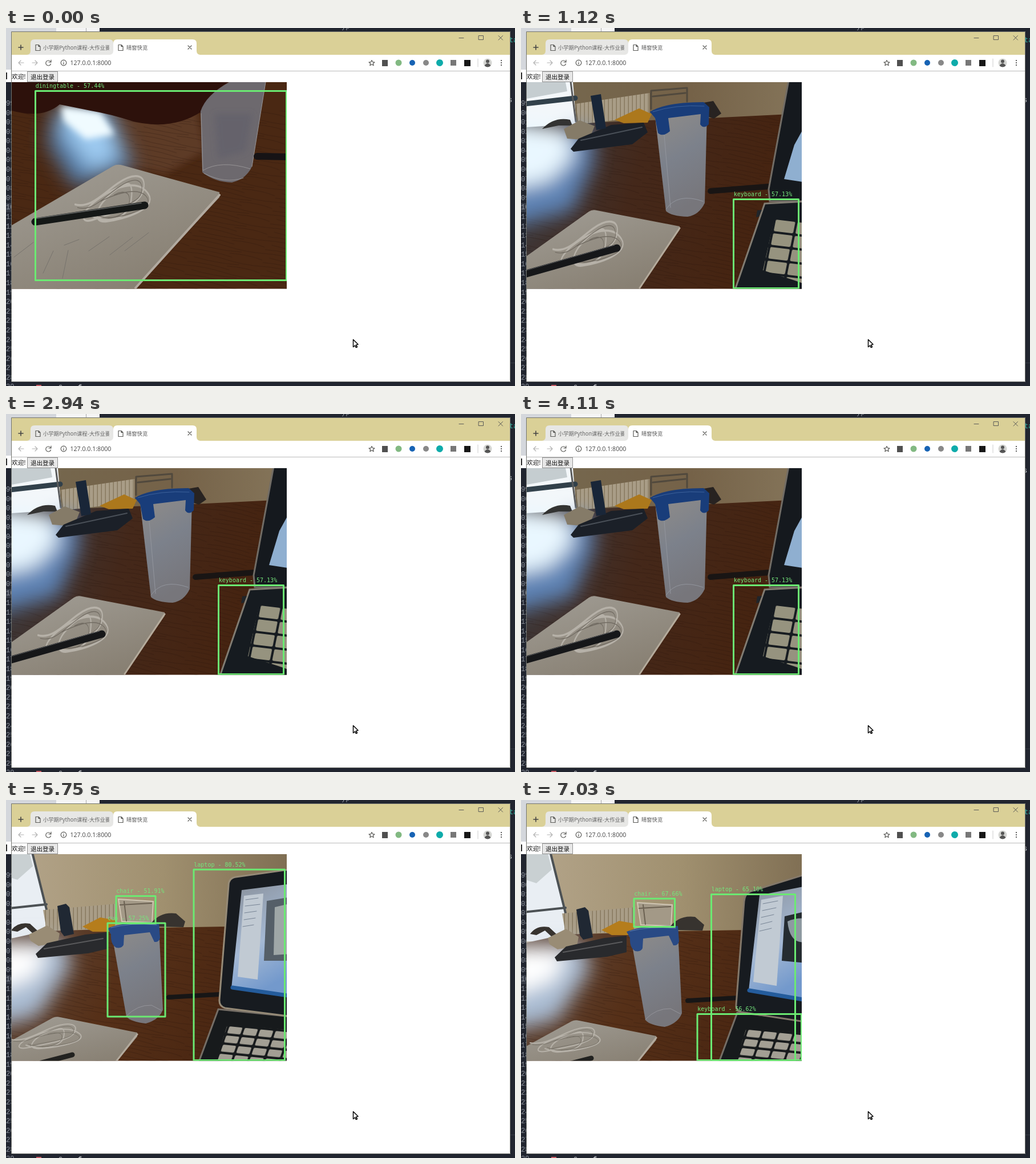
An HTML page that plays this animation: 892x628 px, repeating every 8000 ms.

```html
<!DOCTYPE html>
<html lang="zh">
<head>
<meta charset="utf-8">
<style>
html, body { margin: 0; width: 100%; height: 100%; overflow: hidden; background: #21252f }
svg { display: block; width: 892px; height: 628px }
text { white-space: pre }
.mono { font: 10px "DejaVu Sans Mono", monospace }
.code { font: 12px "Liberation Mono", monospace; fill: #8d939d }
.cjk { font-family: "Noto Sans CJK SC", "Noto Sans CJK", sans-serif }
.line { fill: none; stroke-linecap: round; stroke-linejoin: round }
.label { fill: #74e67c }
.box { fill: none; stroke: #6bea72; stroke-width: 3; stroke-linejoin: round }
</style>
</head>
<body>
<svg viewBox="0 0 892 628">
<defs>
  <clipPath id="photo"><path d="M10 95H492V457.500H10Z"/></clipPath>
  <clipPath id="tab"><path d="M60 20H181V47H60Z"/></clipPath>
  <filter id="blur" x="-60%" y="-60%" width="220%" height="220%"><feGaussianBlur stdDeviation="17"/></filter>
  <filter id="soft" x="-30%" y="-30%" width="160%" height="160%"><feGaussianBlur stdDeviation="6"/></filter>
  <pattern id="grain" width="130" height="23" patternUnits="userSpaceOnUse" patternTransform="rotate(11)">
    <path class="line" stroke="#210d05" stroke-opacity=".3" d="M0 3Q32 -1 65 3T130 3M10 9Q50 13 90 8M70 14Q105 10 128 15M0 19Q40 15 75 20"/>
  </pattern>
  <pattern id="bars" width="7" height="60" patternUnits="userSpaceOnUse">
    <path fill="#a99d87" d="M0 0H7V60H0Z"/><path fill="#87795f" d="M5.500 0H7V60H5.500Z"/>
  </pattern>
  <pattern id="keys" width="27" height="16" patternUnits="userSpaceOnUse" patternTransform="matrix(1 .1 -.35 1 391 396)">
    <rect x="1" y="1" width="23" height="12" rx="2" fill="#a39f94"/>
  </pattern>
  <pattern id="bigKeys" width="38" height="24" patternUnits="userSpaceOnUse" patternTransform="matrix(1 .12 -.2 1 446 335)">
    <rect x="1" y="1" width="34" height="20" rx="2" fill="#96937f"/>
  </pattern>
  <linearGradient id="wall"><stop stop-color="#b4a58b"/><stop offset=".55" stop-color="#a0906f"/><stop offset="1" stop-color="#7e6d52"/></linearGradient>
  <linearGradient id="wallDark"><stop stop-color="#75684f"/><stop offset=".6" stop-color="#756248"/><stop offset="1" stop-color="#85755a"/></linearGradient>
  <linearGradient id="wood" x2="1" y2=".25"><stop stop-color="#604b3f"/><stop offset=".45" stop-color="#563018"/><stop offset="1" stop-color="#472410"/></linearGradient>
  <linearGradient id="woodDark" x2="1" y2=".2"><stop stop-color="#3b3c42"/><stop offset=".45" stop-color="#44281a"/><stop offset="1" stop-color="#46230f"/></linearGradient>
  <linearGradient id="sheet" x2=".6" y2="1"><stop stop-color="#a19d95"/><stop offset="1" stop-color="#888073"/></linearGradient>
  <linearGradient id="plastic" x2=".3" y2="1"><stop stop-color="#8f8c89"/><stop offset=".5" stop-color="#7c818b"/><stop offset="1" stop-color="#77767b"/></linearGradient>
  <linearGradient id="screen" y2="1" x2=".3"><stop stop-color="#89909a"/><stop offset=".6" stop-color="#a5b9d4"/><stop offset="1" stop-color="#7399cc"/></linearGradient>

  <g id="cable" class="line" stroke="#b6b1a8" stroke-width="2">
    <path d="M0 30C25 34 45 20 70 10S118 0 112 16S60 38 32 44S10 36 40 24S104 6 120 20S80 44 52 46S36 30 62 18S96 8 92 26S50 50 26 40"/>
    <path stroke="#726c63" stroke-width=".8" d="M4 33C29 37 47 23 73 13S112 6 109 18S62 34 34 41M42 27S98 10 116 22S82 41 54 43M64 21S91 12 89 27S52 47 30 38"/>
  </g>

  <g id="desk">
    <path fill="url(#wall)" d="M0 80H500V300H0Z"/>
    <path fill="#e9eef3" d="M-5 80H42L69 186V242H-5Z"/>
    <path fill="#c9d0d2" d="M-5 80H38L47 116L20 140L-5 132Z"/>
    <path class="line" stroke="#4c5154" stroke-width="4" d="M43 80L71 192M-5 191L71 183"/>
    <path fill="url(#bars)" d="M65 193L194 182V222L72 232Z"/>
    <path fill="#a39987" stroke="#d1c7b4" stroke-width="2" d="M197 174L258 178L256 215L203 213Z"/>
    <path class="line" stroke="#6a6051" stroke-width="2" d="M200 184L255 181M207 178L211 212"/>
    <path fill="url(#wood)" d="M-5 246L68 230L265 224L386 222L510 240V470H-5Z"/>
    <path fill="url(#grain)" d="M-5 260L230 228L386 223L492 240V470H-5Z"/>
    <g filter="url(#blur)"><path fill="#a9bbd2" d="M-30 249L100 246L115 290L55 380L-30 400Z"/><path fill="#fff" d="M-30 253L73 258L53 310L-30 342Z"/></g>
    <path fill="#37332f" d="M9 229Q20 213 42 217L56 230L48 235L35 223L20 231ZM250 222Q267 195 298 199L314 213L311 223Z"/>
    <path fill="#998c75" d="M40 236L72 220L94 234L91 250L57 256L43 247Z"/>
    <path fill="#b57d1c" d="M134 222L165 206L193 211L188 231L152 231Z"/>
    <path fill="#292a2d" d="M52 270L72 251L139 236L178 232L178 261L144 269L56 277Z"/>
    <path class="line" stroke="#5a5a5c" stroke-width="2" d="M67 261L170 243"/>
    <path fill="#202833" d="M90 186L105 182L111 188L119 235L102 239L96 231Z"/>
    <path class="line" stroke="#171616" stroke-width="8" d="M285 346L373 341"/>
    <path fill="url(#plastic)" d="M184 227L268 224L275 368Q268 386 245 392Q219 389 211 380Z"/>
    <path class="line" stroke="#94949a" d="M211 379Q230 359 255 360L272 369"/>
    <path fill="#294a85" d="M178 225Q207 213 268 215L270 242Q268 250 260 249L252 232L207 237L206 254Q203 261 193 259Q183 253 184 236Z"/>
    <path class="line" stroke="#627fae" d="M184 224Q218 215 264 219"/>
    <path fill="url(#sheet)" d="M-5 430L82 382Q88 379 95 381L230 408V415L185 470H-5Z"/>
    <path class="line" stroke="#b3aa9d" stroke-width="3" d="M230 411L188 465"/>
    <use href="#cable" x="9" y="390"/>
    <path class="line" stroke="#222220" stroke-width="9" d="M62 461L116 447"/>
    <path fill="#171a1c" stroke="#756e66" stroke-width="3" d="M372 367L510 381V470H334Z"/>
    <path fill="url(#keys)" d="M388 394L500 404V470H364Z"/>
    <path class="line" stroke="#8d8378" stroke-width="4" d="M400 364L462 371"/>
  </g>
</defs>

<g id="backdrop">
  <path fill="#d4d7dc" d="M0 0H88V73H0Z"/><path fill="#f5f5f5" d="M88 0H164V7H88Z"/>
  <path fill="#aaa" d="M140 0H141V7H140Z"/><path fill="#fff" d="M0 73H10V95H0Z"/>
  <path fill="#333" d="M0 78H2V90H0Z"/>
  <path fill="#363b46" d="M0 307H10V323H0ZM884 587H892V588H884Z"/>
  <text class="code" x="588" y="1">yp</text>
  <text class="code" x="882" y="25" font-size="10" style="fill:#36b6a5">ta</text>
  <text class="code" x="92" y="633" style="fill:#d5d7dc">s</text>
  <text class="code" x="126" y="634" style="fill:#d5d7dc">f</text>
  <path fill="#c95c66" d="M53 626H62V628H53Z"/>
  <text class="code" id="scroll" x="880" style="fill:#d5d7dc">s</text>
</g>

<path fill="#fff" d="M10 6H884V621H10Z"/>
<path fill="#dad097" d="M10 6H884V47H10Z"/>
<path fill="#e7e7e5" d="M37 47Q43 46 43 40V27Q43 20 50 20H181Q188 20 188 27V47Z"/>
<path fill="#fff" d="M182 47Q188 46 188 40V27Q188 20 195 20H327Q334 20 334 27V40Q334 46 340 47Z"/>
<path fill="#b9b9b9" d="M10 75H884V76H10Z"/>
<path fill="none" stroke="#72746f" d="M9.500 6.500H883.500V620.500H9.500Z"/>
<g class="line" stroke="#5b5b58" stroke-width="1.200">
  <path d="M22 34H30M26 30V38" stroke="#444" stroke-width="1.600"/>
  <path d="M52 29.500H57L60 32.500V39.500H52ZM57 29.500V32.500H60M197 29.500H202L205 32.500V39.500H197ZM202 29.500V32.500H205"/>
  <path d="M319 31L325 37M325 31L319 37"/>
  <path stroke-width="1" d="M794 17.500H802M828.500 13.500H836.500V20.500H828.500ZM863 13.500L870.500 21M870.500 13.500L863 21"/>
  <path stroke="#b2b2b2" d="M31 61H22M26 57L22 61L26 65M46 61H55M51 57L55 61L51 65"/>
  <path d="M78 59A4.500 4.500 0 1 0 78.500 63M79 56V60H75"/>
  <circle cx="101" cy="61" r="4.800"/><path d="M101 60.500V63.500M101 58.500V58.600"/>
  <path d="M641 56.500L642.500 59.700L646 60L643.300 62.300L644.200 65.700L641 63.800L637.800 65.700L638.700 62.300L636 60L639.500 59.700Z"/>
  <path stroke="#d6d6d6" d="M827 54V68"/>
</g>
<g>
  <rect x="659" y="56" width="10" height="11" fill="#505050"/>
  <circle cx="688" cy="61" r="5.500" fill="#82b982"/>
  <circle cx="712" cy="61" r="5" fill="#1763b4"/>
  <circle cx="736" cy="61" r="5" fill="#888"/>
  <circle cx="760" cy="61" r="6" fill="#0eabaa"/>
  <rect x="779" y="56" width="10" height="10" fill="#777"/>
  <rect x="803" y="56" width="11" height="11" fill="#171717"/>
  <circle cx="844" cy="61" r="7.500" fill="#d4d5d2"/>
  <circle cx="844" cy="58.500" r="3" fill="#555"/><path fill="#555" d="M838.500 66Q844 58 849.500 66Q844 71 838.500 66Z"/>
  <path class="line" stroke="#444" stroke-width="2.200" d="M868 57V57.100M868 61V61.100M868 65V65.100"/>
</g>
<g class="cjk" font-size="9.300" fill="#666">
  <text x="65" y="37.500" clip-path="url(#tab)">小学期Python课程-大作业要</text>
  <text x="211" y="37.500" fill="#555">晴窗快览</text>
  <text x="10" y="89" font-size="10.670" fill="#111">欢迎!</text>
</g>
<text x="112.500" y="65" font-size="10.600" font-family="Open Sans, sans-serif" fill="#444">127.0.0.1:8000</text>
<rect x="37.500" y="76.500" width="53" height="18" fill="#e8e8e8" stroke="#929292"/>
<text class="cjk" x="43" y="89.500" font-size="10.500" fill="#111">退出登录</text>

<g clip-path="url(#photo)">
  <g class="scene">
    <path fill="#4a2813" d="M10 95H492V458H10Z"/>
    <path fill="#5d3a27" filter="url(#soft)" d="M174 152L333 144L348 215L280 255L190 238L143 180Z"/>
    <path fill="url(#grain)" d="M10 145H492V458H10Z"/>
    <g filter="url(#blur)"><path fill="#547da9" d="M85 143L183 139L225 246L120 280L72 202Z"/><path fill="#9ecbf1" d="M98 139L168 145L200 225L150 250L100 180Z"/></g>
    <path fill="#f0fbff" filter="url(#soft)" d="M96 137L166 148L190 187L140 195L101 163Z"/>
    <path fill="#2d110b" d="M10 95H390Q359 112 342 147Q291 180 223 164Q184 151 148 145L94 134Q64 160 10 145Z"/>
    <path fill="#706e74" fill-opacity=".94" d="M391 95H455L431 243Q421 265 396 271Q365 270 344 253L341 146Q350 118 391 95Z"/>
    <path fill="#5b5a69" fill-opacity=".4" filter="url(#soft)" d="M365 150H432L420 217L371 230Z"/>
    <path class="line" stroke="#969395" d="M342 150L345 250Q376 231 428 247M347 255Q384 274 416 263M455 95L431 243"/>
    <path class="line" stroke="#161315" stroke-width="12" d="M440 225L494 226"/>
    <path fill="url(#sheet)" d="M10 346L188 242Q195 238 205 241L374 288V297L225 458H10Z"/>
    <path class="line" stroke="#b2aaa0" stroke-width="4" d="M374 293L227 456"/>
    <use href="#cable" transform="translate(121 254) scale(1.070 1.850)"/>
    <path class="line" stroke="#77736d" d="M14 402L48 376M83 391L65 430M102 381L128 371M109 390L99 439M145 391L181 366M182 398L222 367M208 391L250 359"/>
    <path class="line" stroke="#151817" stroke-width="13" stroke-linecap="butt" d="M51 340L243 311"/>
    <path class="line" stroke="#656766" stroke-width="1.500" d="M53 334L237 307"/>
  </g>

  <g class="scene">
    <path fill="url(#wallDark)" d="M10 95H492V210H10Z"/>
    <path fill="#f3f7fa" d="M10 95H91L98 178H10Z"/>
    <path fill="#c5cdd0" d="M10 95H78L81 111L10 124Z"/>
    <path class="line" stroke="#31404a" stroke-width="9" d="M8 133L95 123"/>
    <path class="line" stroke="#58595a" stroke-width="3" d="M87 94L96 164"/>
    <path fill="url(#bars)" d="M96 133L225 114V155L101 169Z"/>
    <path class="line" stroke="#51493d" stroke-width="3" d="M228 142V110L291 105V129M231 120L288 114"/>
    <path fill="url(#woodDark)" d="M10 174L149 165L330 158L492 150V458H10Z"/>
    <path fill="url(#grain)" d="M10 206L225 170L492 152V458H10Z"/>
    <g filter="url(#blur)"><path fill="#5d82b4" d="M-30 172L125 178L128 235L90 320L-30 352Z"/><path fill="#e9f7ff" d="M-30 162L78 176L92 225L50 268L-30 285Z"/></g>
    <path fill="#333332" d="M37 177Q58 155 86 161L90 171L66 171Z"/>
    <path fill="#857b68" d="M75 177L103 162L129 172L119 197L81 194Z"/>
    <path fill="#ac781c" d="M164 161L207 141L229 151L222 166L180 167Z"/>
    <path fill="#1b2028" d="M87 212L101 194L158 170L215 166L222 183L195 204L92 217Z"/>
    <path class="line" stroke="#4a5058" stroke-width="2" d="M105 197L212 174"/>
    <path fill="#192638" d="M122 119L140 116L149 176L132 179Z"/>
    <path fill="#282321" d="M320 131L337 128L351 150L338 159L326 155Z"/>
    <path class="line" stroke="#191514" stroke-width="10" d="M332 286L434 278"/>
    <path fill="url(#plastic)" d="M235 156L326 149L322 307Q312 328 292 331Q263 330 254 321Z"/>
    <path class="line" stroke="#92959d" d="M254 318Q274 288 319 304M250 177L262 315"/>
    <path fill="#193d7a" d="M226 147Q254 130 320 130L330 139L329 169Q320 178 314 169L315 151L258 158L261 181Q248 192 240 184L235 158Z"/>
    <path class="line" stroke="#3d629b" d="M231 147Q270 134 321 137"/>
    <path fill="url(#sheet)" d="M10 400L119 322Q125 318 133 320L278 348V354L206 458H10Z"/>
    <path class="line" stroke="#b4aa9b" stroke-width="3" d="M278 351L208 456"/>
    <use href="#cable" transform="translate(56 334) scale(1 1.800)"/>
    <path class="line" stroke="#161719" stroke-width="13" stroke-linecap="butt" d="M9 431L168 386"/>
    <path class="line" stroke="#55575a" d="M10 425L164 381"/>
    <path fill="#15191e" stroke="#716c65" stroke-width="3" d="M469 92H500V304H436L434 283Z"/>
    <path fill="#8fafd0" d="M479 205L494 178V270L461 265Z"/>
    <path fill="#161b20" stroke="#817c72" stroke-width="3" d="M427 308L500 304V465H373Z"/>
    <path fill="#20252a" d="M414 320L422 319L417 331L412 332Z"/>
    <path fill="url(#bigKeys)" d="M444 334L500 342V450L480 443L424 425Z"/>
  </g>

  <g class="scene">
    <use href="#desk"/>
    <path fill="#171b20" stroke="#958a77" stroke-width="3" d="M390 150Q390 137 403 135L510 120V381L384 365Q373 362 374 350Z"/>
    <path fill="url(#screen)" d="M413 158L500 147V347L395 330Z"/>
    <path fill="#c1cad3" d="M417 168L451 164L441 315L406 310Z"/>
    <path class="line" stroke="#768394" d="M420 175L442 172M419 186L445 183M418 198L439 195M417 210L437 207M415 222L434 219"/>
    <path fill="#555f68" d="M457 177L500 170V282L452 282Z"/><path fill="#9fa7a7" d="M471 188L500 181V270L469 272Z"/>
    <path class="line" stroke="#245c9c" stroke-width="7" d="M397 329L494 343"/>
  </g>

  <g class="scene">
    <use href="#desk" transform="translate(7 6)"/>
    <path fill="#171b20" stroke="#83786a" stroke-width="3" d="M391 178Q392 164 403 160L510 127V391L386 372Q376 370 377 359Z"/>
    <path fill="url(#screen)" d="M418 167L500 151V351L399 334Z"/>
    <path fill="#c1cad3" d="M421 175L459 168L448 326L407 319Z"/>
    <path class="line" stroke="#768394" d="M424 182L450 177M423 194L447 189M421 206L443 201M420 218L440 213M418 230L439 225"/>
    <path fill="#252c31" d="M462 204L500 195V286L457 282Z"/><path fill="#8e9aa1" d="M467 213Q482 206 500 208V249Q471 254 467 213Z"/>
    <path class="line" stroke="#245c9c" stroke-width="7" d="M400 334L494 350"/>
  </g>
</g>

<path fill="#fff" stroke="#111" stroke-width="1.600" stroke-linejoin="round" d="M608.500 546.500V559.500L611.500 557L613.500 560.500L615.500 559.500L613.500 556L617 555Z"/>
</svg>
<script>
const svg = document.querySelector('svg');
const scenes = [...document.querySelectorAll('.scene')];
const backdrop = document.getElementById('backdrop');
const scroll = document.getElementById('scroll');

function add(parent, tag, attrs, text = '') {
  const node = document.createElementNS(svg.namespaceURI, tag);
  for (const key in attrs) node.setAttribute(key, attrs[key]);
  node.textContent = text;
  parent.append(node);
}

for (let i = 0; i <= 30; i++) {
  const number = String((99 + i) % 100).padStart(2, '0');
  add(backdrop, 'text', { class: 'code', x: 0, y: 136 + i * 16.58 }, number);
}

const detections = [
  [['diningtable - 57.44%', 51.5, 110.5, 491.5, 442.5]],
  [['keyboard - 57.13%', 372.5, 300.5, 486.5, 456.5]],
  [['laptop - 80.52%', 329, 122, 488.5, 456.5], ['chair - 51.91%', 193, 168.5, 262, 216.5], ['cup - 57.25%', 178, 216, 279, 380]],
  [['chair - 67.66%', 198, 173, 269.5, 222.5], ['laptop - 65.10%', 333.5, 165.5, 480.5, 456.5], ['keyboard - 56.62%', 309, 375.5, 491.5, 456.5]]
];
detections.forEach((list, i) => {
  for (const [label, x, y, right, bottom] of list) {
    add(scenes[i], 'rect', { class: 'box', x, y, width: right - x, height: bottom - y });
    add(scenes[i], 'text', { class: 'mono label', x: x + .3, y: y - 5.5 }, label);
  }
});

const passed = (time, cuts) => cuts.filter(cut => time >= cut).length;

function draw() {
  const time = performance.now() % 8000;
  const current = passed(time, [1120, 4480, 7030]);
  scenes.forEach((scene, i) => scene.style.display = i === current ? '' : 'none');
  scroll.setAttribute('y', 129.5 - 13.5 * passed(time, [1190, 4110, 6600]));
  requestAnimationFrame(draw);
}
draw();
</script>
</body>
</html>
```
